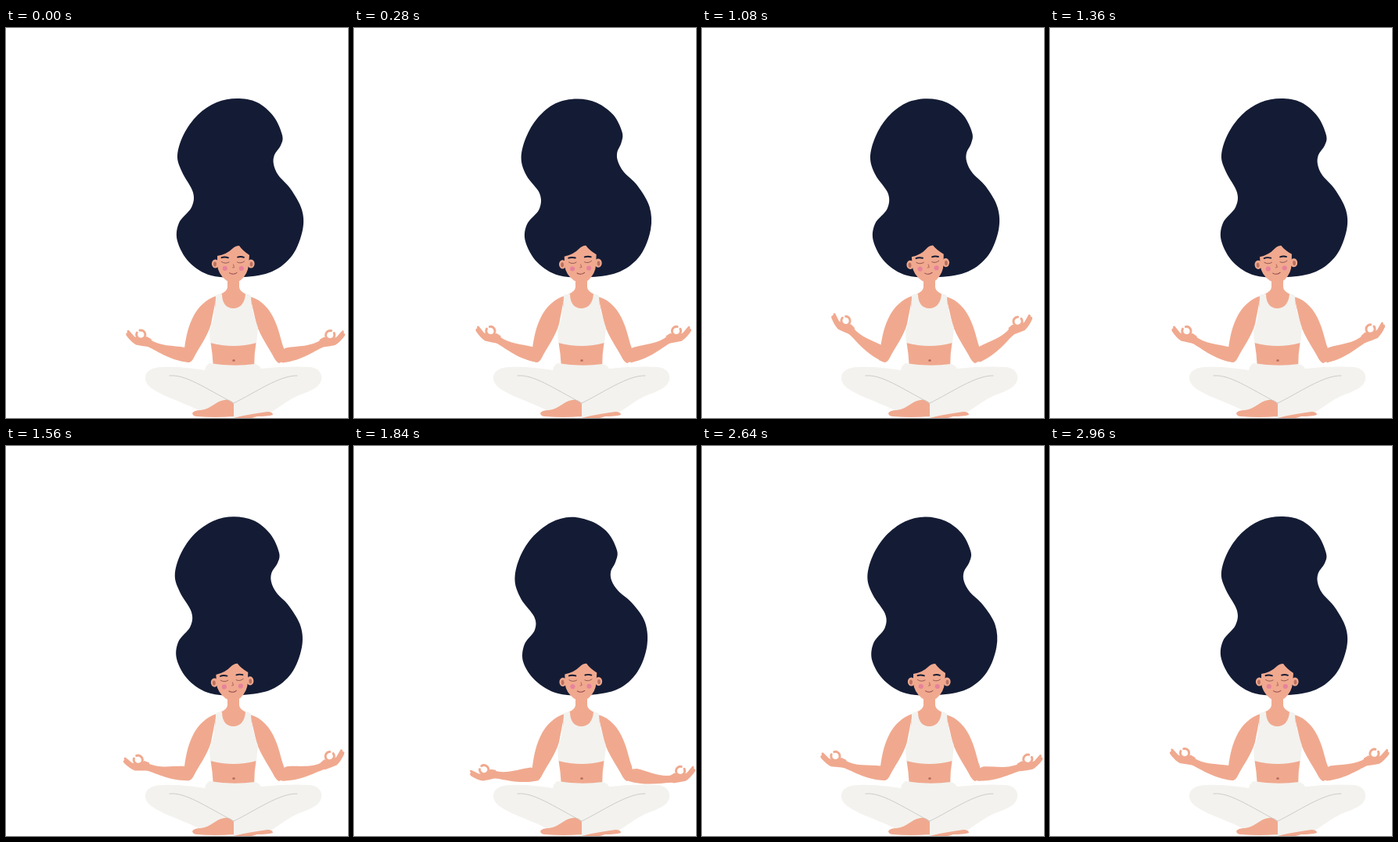
These frames come from a looping animation (437x498 px, 3000 ms). An HTML page with a canvas:

```html
<!DOCTYPE html>
<html lang="en">
<head>
<meta charset="utf-8">
<title>Meditation</title>
<style>
html, body { margin: 0; width: 100%; height: 100%; overflow: hidden; background: #fff; }
canvas { display: block; }
</style>
</head>
<body>
<canvas id="stage" width="437" height="498"></canvas>
<script>
const ctx = document.getElementById('stage').getContext('2d');
const LOOP = 3000, STEP = 40;
const SKIN = '#f0a98f', HAIR = '#141c35', CLOTH = '#f3f2ee', SHADE = '#b9705f';

// Hair outlines, clockwise from the crown: upright, first sway, second sway
const upright = [295,90, 321,95, 342,113, 353,137, 351,150, 343,162, 342,174, 348,188, 364,206,
  378,232, 379,258, 366,290, 340,311, 303,318, 262,316, 234,299, 219,272, 221,249,
  237,229, 239,210, 225,184, 219,163, 227,136, 245,111, 269,95];
const swayA = [270,91, 295,96, 317,109, 328,128, 328,142, 327,153, 330,164, 340,178, 360,195,
  377,223, 379,257, 366,290, 340,311, 303,318, 262,316, 234,299, 219,273, 221,253,
  236,235, 235,214, 214,195, 206,170, 210,144, 220,120, 241,98];
const swayB = [269,91, 295,97, 316,110, 328,132, 326,147, 321,159, 323,171, 333,184, 351,198,
  369,222, 372,255, 360,288, 336,310, 300,318, 260,316, 231,300, 215,278, 216,256,
  228,238, 226,222, 208,201, 199,176, 203,149, 218,121, 243,99];

// Angles in degrees over time; positive lifts the arm
const track = {
  leftFore: [[0, 0], [560, 9.5], [1080, 18], [1560, -8], [1920, -19], [2240, -16], [2640, -4], [3000, 0]],
  leftHand: [[0, 0], [560, 6], [1080, 15], [1560, -9], [1920, -23], [2240, -20], [2640, -4], [3000, 0]],
  rightFore: [[0, 0], [560, 10], [1080, 18], [1560, -6], [2060, -31], [2240, -26], [2640, -8], [3000, 0]],
  rightHand: [[0, 0], [560, 5], [1080, 12], [1560, 12], [2060, -6], [2240, -3], [2640, 0], [3000, 0]],
  head: [[0, 0], [500, -3.5], [1150, -3.5], [1560, -2.7], [2100, 0], [3000, 0]]
};

const shape = {
  neck: 'M283 316 L283 331 C282 338 274 339 268 343 L266 372 L316 372 L313 344 C307 339 299 338 298 331 L298 316 Z',
  belly: 'M261 398 L320 398 Q317 416 317 434 L265 434 Q264 416 261 398 Z',
  leftArm: 'M269 342 C256 346 246 356 240 367 C233 380 230 394 228 409 L226 424 L233 427 Q237 427 240 421 C246 409 258 393 262 378 Z',
  rightArm: 'M312 343 C327 347 338 360 344 375 C350 389 351 399 355 409 L357 424 L349 428 Q346 427 343 422 C337 410 325 394 320 378 Z',
  top: 'M268 341 Q272 339 276 339.5 C276 352 282 358 290.5 358 C299 358 305 352 306 339.5 Q310 339 313 342 C313 359 319 373 322 383 L320 402 Q291 410 261 402 L260 387 C266 371 268 356 268 341 Z',
  pants: 'M260 428 Q290 433 318 429 Q323 430 326 435 C350 432 373 432 389 433 C401 435 404 442 403 449 C401 459 388 464 374 469 C360 475 350 484 340 490 L291 498 L270 490 L246 488 C234 482 216 475 204 470 C187 462 178 456 178 447 C178 438 187 433 199 433 C217 432 236 434 254 437 Q255 431 260 428 Z',
  leftFoot: 'M238 492 Q240 488 249 488 C263 486 267 477 279 475 Q287 474 291 480 L291 496 Q267 498 244 496 Q239 496 238 492 Z',
  rightFoot: 'M291 498 C306 494 321 492 334 490 Q341 490 341 494 Q334 496 321 496 L314 498 Z',
  creases: 'M209 444 C229 442 253 459 291 479 M291 479 C318 466 350 443 372 444',
  forearm: 'M229 408 C213 405 197 407 183 397 L178 405.5 C192 411 207 424 233 427 Q241 423 238 413 Z',
  palm: 'M186 397.5 L180 394 L172 397 L164 394 L157 386 Q154 385 155 389 Q152 390 154 393 Q160 401 166 404.5 Q174 406 182 407 Z',
  face: 'M270 291 Q282 289 289 282 Q293 278 298 278 Q302 284 311 290 L310 303 Q309 314 300 322 Q290 329 281 322 Q271 314 270 303 Z',
  brows: 'M275.5 293.2 Q279 291.8 284 293.3 M296 292.6 Q300 291.4 304 292.8',
  eyes: 'M275.5 298.5 Q280 301.8 285 299 M295.5 299 Q300 301.4 304.5 298'
};
for (const k in shape) shape[k] = new Path2D(shape[k]);

function fill(path, color) {
  ctx.fillStyle = color;
  ctx.fill(path);
}

function line(path, color, width) {
  ctx.strokeStyle = color;
  ctx.lineWidth = width;
  ctx.lineCap = 'round';
  ctx.stroke(path);
}

function oval(x, y, rx, ry, color) {
  ctx.fillStyle = color;
  ctx.beginPath();
  ctx.ellipse(x, y, rx, ry, 0, 0, Math.PI * 2);
  ctx.fill();
}

function turn(x, y, deg) {
  ctx.translate(x, y);
  ctx.rotate(deg * Math.PI / 180);
  ctx.translate(-x, -y);
}

// Smooth interpolation that rests at turning points
function sample(keys, t) {
  let i = 0;
  while (i < keys.length - 2 && t >= keys[i + 1][0]) i++;
  const n = keys.length - 1;
  const slope = j => {
    const k = (j + n) % n;
    return (keys[k + 1][1] - keys[k][1]) / (keys[k + 1][0] - keys[k][0]);
  };
  const tangent = j => {
    const a = slope(j - 1), b = slope(j);
    return a * b <= 0 ? 0 : 2 * a * b / (a + b);
  };
  const [t0, a] = keys[i], [t1, b] = keys[i + 1];
  const d = t1 - t0, u = (t - t0) / d, v = 1 - u;
  return a * v * v * (1 + 2 * u) + b * u * u * (3 - 2 * u)
    + d * u * v * (v * tangent(i) - u * tangent(i + 1));
}

const ease = (a, b, t) => (1 - Math.cos(Math.PI * Math.min(1, Math.max(0, (t - a) / (b - a))))) / 2;

function drawHair(t) {
  const a = ease(0, 630, t) - ease(630, 1350, t);
  const b = ease(1350, 2150, t) - ease(2150, LOOP, t);
  const p = upright.map((v, i) => v + (swayA[i] - v) * a + (swayB[i] - v) * b);
  const n = p.length / 2;
  const at = i => { const k = (i + n) % n * 2; return [p[k], p[k + 1]]; };
  ctx.beginPath();
  ctx.moveTo(p[0], p[1]);
  for (let i = 0; i < n; i++) {
    const [o, s, e, q] = [at(i - 1), at(i), at(i + 1), at(i + 2)];
    ctx.bezierCurveTo(s[0] + (e[0] - o[0]) / 6, s[1] + (e[1] - o[1]) / 6,
      e[0] - (q[0] - s[0]) / 6, e[1] - (q[1] - s[1]) / 6, e[0], e[1]);
  }
  ctx.fillStyle = HAIR;
  ctx.fill();
}

function drawForearm(fore, hand, mirrored) {
  ctx.save();
  if (mirrored) {
    ctx.translate(586.5, 0.5);
    ctx.scale(-1, 1);
  }
  turn(235, 420, fore);
  fill(shape.forearm, SKIN);
  turn(181, 401, hand - fore);
  oval(181, 401.3, 5, 5, SKIN);
  fill(shape.palm, SKIN);
  ctx.beginPath();
  ctx.arc(172.3, 391.5, 5.6, -1.8, 3.6);
  ctx.strokeStyle = SKIN;
  ctx.lineWidth = 3;
  ctx.lineCap = 'round';
  ctx.stroke();
  ctx.restore();
}

function drawHead(deg) {
  ctx.save();
  turn(290, 326, deg);
  for (const [x, s] of [[267.5, 1], [313, -1]]) {
    oval(x, 301, 4.6, 5.6, SKIN);
    oval(x - s * 0.5, 301.5, 1.9, 3.1, SHADE);
  }
  fill(shape.face, SKIN);
  oval(279.8, 307, 3.1, 3, '#e8829b');
  oval(300.8, 307, 3.1, 3, '#e8829b');
  line(shape.brows, HAIR, 1.9);
  line(shape.eyes, '#8d5148', 0.9);
  line(new Path2D('M290.5 302 L291.5 305.5 L289.5 306'), SHADE, 1.1);
  line(new Path2D('M285.5 312.8 Q290.5 316 295 312.5'), '#8d4548', 1);
  ctx.restore();
}

function draw(t) {
  ctx.fillStyle = '#fff';
  ctx.fillRect(0, 0, 437, 498);
  drawHair(t);
  fill(shape.neck, SKIN);
  fill(shape.belly, SKIN);
  oval(291, 424.5, 1.8, 1.6, SHADE);
  fill(shape.pants, CLOTH);
  fill(shape.leftFoot, SKIN);
  fill(shape.rightFoot, SKIN);
  line(shape.creases, '#c9c8c4', 0.9);
  fill(shape.leftArm, SKIN);
  fill(shape.rightArm, SKIN);
  drawForearm(sample(track.leftFore, t), sample(track.leftHand, t), false);
  drawForearm(sample(track.rightFore, t), sample(track.rightHand, t), true);
  fill(shape.top, CLOTH);
  drawHead(sample(track.head, t));
}

const start = performance.now();
function tick() {
  const t = (performance.now() - start) % LOOP;
  draw(Math.floor(t / STEP) * STEP);
  requestAnimationFrame(tick);
}
tick();
</script>
</body>
</html>
```
